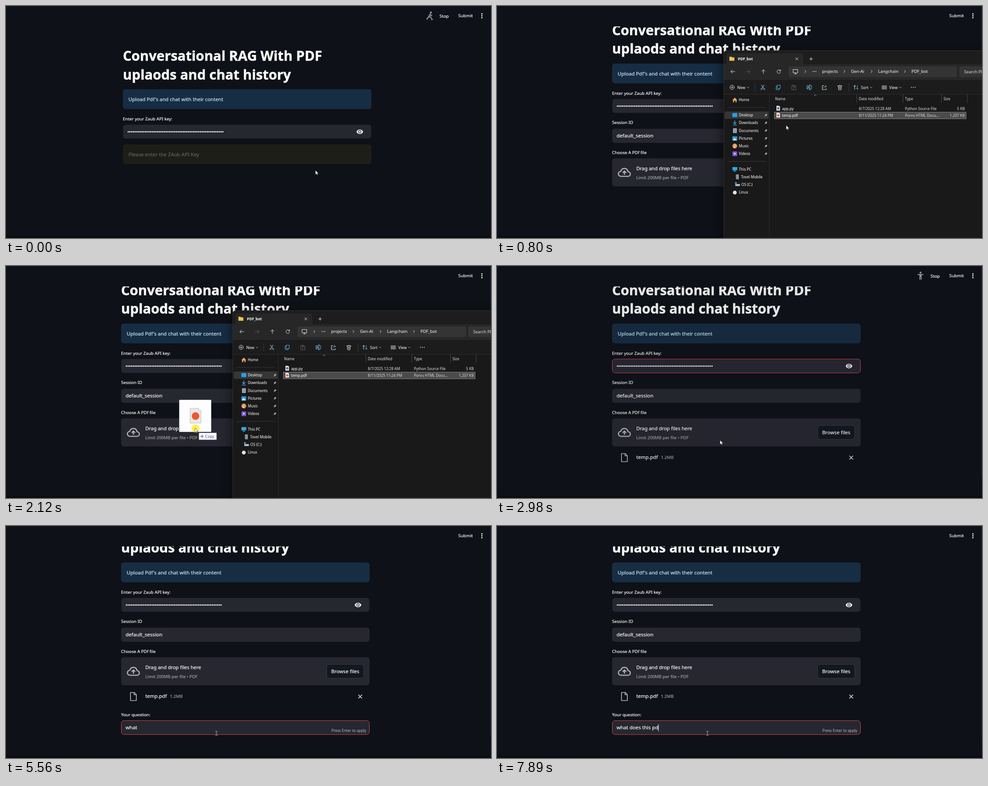
An HTML page for the animation above (8000 ms loop, 1083x517 px).

```html
<!DOCTYPE html>
<html lang="en">
<head>
<meta charset="utf-8">
<title>PDF chat demo</title>
<style>
html, body { margin: 0; width: 100%; height: 100%; overflow: hidden; background: #0e1117; }
svg { display: block; width: 100vw; height: 100vh; }
text { font: 11.2px "Noto Sans", "Open Sans", sans-serif; color: #fafafa; fill: currentColor; stroke: currentColor; stroke-width: .22; white-space: pre; }
.title { font-size: 30.35px; font-weight: 700; stroke-width: .5; }
.label { font-size: 9.62px; }
.bar { font-size: 9.8px; }
.dim { font-size: 9.6px; color: #a0a1a7; }
.hint { font-size: 8.35px; color: #9a9ba1; }
.field { fill: #262730; stroke: none; }
.field.focus { stroke: #d2484b; }
.line { fill: none; stroke: #e4e4e4; stroke-linecap: round; stroke-linejoin: round; }
.blue { stroke: #55b4ea; }
.faint { stroke: #5d5d5d; }
#explorer text { font-size: 8.18px; color: #ececec; stroke-width: .1; }
#explorer .path { font-size: 9.4px; }
#explorer .cmd { font-size: 8.6px; }
#explorer .tab { font-size: 8.3px; font-weight: 600; }
#explorer .grey { color: #cfcfcf; }
</style>
</head>
<body>
<svg viewBox="0 0 1083 517">
  <defs>
    <filter id="blur" x="-20%" y="-20%" width="140%" height="140%"><feGaussianBlur stdDeviation="13"/></filter>
    <linearGradient id="edge" x2="0" y2="1"><stop stop-color="#000" stop-opacity="0"/><stop offset="1" stop-color="#000" stop-opacity=".45"/></linearGradient>
    <path id="pin" d="M.6 -3.4L3.4 -.6L2.2 -.2L1 1L.7 2.7L-.6 1.4L-3.4 3.8L-1.3 .7L-2.7 -.7L-1 -1L.2 -2.2Z" fill="#b5b5b5"/>
    <path id="next" class="line" d="M-1.3 -2.6L1.3 0L-1.3 2.6"/>
    <path id="down" class="line" d="M-2 -1L0 1L2 -1" stroke-width=".8"/>
  </defs>
  <rect width="1083" height="517" fill="#0e1117"/>

  <g id="page">
    <text class="title" x="257" y="65">Conversational RAG With PDF</text>
    <text class="title" x="257" y="106.4">uplaods and chat history</text>
    <rect x="257" y="128.3" width="555" height="44.2" rx="6" fill="#172d43"/>
    <text x="269.5" y="154.6" style="color:#c7ebff">Upload Pdf's and chat with their content</text>
    <text class="label" x="257" y="197.8">Enter your Zaub API key:</text>
    <rect id="key" class="field" x="257.5" y="207.3" width="554" height="31" rx="6"/>
    <path d="M269 223H480.5" stroke="#fafafa" stroke-width="3.1" stroke-linecap="round" stroke-dasharray="0 3.84"/>
    <g transform="translate(786 223)">
      <path d="M-7.5 0C-4.5 -6.6 4.5 -6.6 7.5 0C4.5 6.6 -4.5 6.6 -7.5 0Z" fill="#fafafa"/>
      <circle r="3.4" fill="#262730"/><circle r="2" fill="#fafafa"/>
    </g>
    <g id="warning">
      <rect x="257" y="251.2" width="555" height="44" rx="6" fill="#1e1e18"/>
      <text x="269.5" y="277.5" style="color:#62615c">Please enter the ZAub API Key</text>
    </g>
    <g id="session">
      <text class="label" x="257" y="263.4">Session ID</text>
      <rect class="field" x="257" y="273.5" width="555" height="31.5" rx="6"/>
      <text x="267" y="293" style="font-size:11.35px">default_session</text>
      <text class="label" x="257" y="330">Choose A PDf file</text>
      <rect class="field" x="257" y="339.5" width="555" height="62.5" rx="6"/>
      <g class="line" transform="translate(284.5 371)" style="stroke:#b4b5bc" stroke-width="2.4">
        <path d="M-7.5 8.6C-15 8.6 -15.5 -1.6 -8 -2.6C-5.5 -11.5 6.5 -11 8 -1.6C15 -1.6 15 8.6 8 8.6Z"/>
        <path d="M0 5V-2.6M-4 .6L0 -3.2L4 .6" stroke-linecap="butt"/>
      </g>
      <text x="311" y="366.4" style="font-size:10.95px">Drag and drop files here</text>
      <text class="dim" x="311" y="385.8">Limit 200MB per file • PDF</text>
      <rect x="716" y="355.3" width="83" height="31" rx="6" fill="#131720" stroke="#3b3d46"/>
      <text x="757.5" y="374.8" text-anchor="middle">Browse files</text>
    </g>
    <g id="file">
      <path class="line" d="M278 418H286.5L291 422.5V436H278ZM286 418.3V423H290.7" style="stroke:#b4b5bc" stroke-width="1.7"/>
      <text x="311" y="429.8">temp.pdf</text>
      <text class="dim" x="366" y="429.8">1.2MB</text>
      <path class="line" d="M787.2 423.2L794.8 430.8M794.8 423.2L787.2 430.8" stroke-width="1.5"/>
    </g>
    <g id="question">
      <text class="label" x="257" y="471.2">Your question:</text>
      <rect id="ask" class="field" x="257.5" y="480.7" width="554" height="31" rx="6"/>
      <text id="typed" x="267" y="500.2"></text>
      <rect id="caret" y="489" width="1" height="15.6" fill="#fafafa"/>
      <text id="hint" class="hint" x="804.5" y="506" text-anchor="end">Press Enter to apply</text>
    </g>
  </g>

  <rect width="1083" height="45.5" fill="#0e1117"/>
  <g id="running">
    <g id="skier" class="line" style="stroke:#929294" stroke-width="2">
      <circle cx="948.8" cy="14.6" r="1.3" fill="#929294"/>
      <path d="M946.8 18L943.5 24L949 25.5L951.5 30M946.8 18L950 22M943.5 24L940 29.5" stroke-width="2.2"/>
      <path d="M951.5 20L939.5 27.5M949 31L953.5 30" stroke-width="1.1"/>
    </g>
    <g id="person" class="line" style="stroke:#929294" stroke-width="2">
      <circle cx="945.7" cy="14.8" r="1.2" fill="#929294"/>
      <path d="M939.2 19H952.2" stroke-linecap="butt"/>
      <path d="M944.2 19V30.5M947.2 19V30.5M945.7 19V24.5" stroke-linecap="butt"/>
    </g>
    <text class="bar" x="968" y="25.6">Stop</text>
  </g>
  <text class="bar" x="1009.8" y="25.3">Submit</text>
  <g fill="#fafafa"><circle cx="1062.7" cy="17.4" r="1.5"/><circle cx="1062.7" cy="21.7" r="1.5"/><circle cx="1062.7" cy="26" r="1.5"/></g>
  <rect id="scrollbar" x="1082" width="1" height="470" fill="#25272f"/>
  <rect y="511" width="1083" height="6" fill="url(#edge)"/>

  <g id="explorer">
    <rect x="506" y="106" width="620" height="450" opacity=".6" filter="url(#blur)"/>
    <path d="M506.5 520V107Q506.5 99.5 514 99.5H1090V520Z" fill="#1d1d1d" stroke="#333"/>
    <path d="M507 130H512V111Q512 105.5 517 105.5H679Q684 105.5 684 111V130H1083V163.5H507Z" fill="#272727"/>
    <rect x="507" y="163.5" width="576" height="33.5" fill="#1c1c1c"/>
    <rect x="507" y="197" width="576" height="320" fill="#191919"/>
    <path d="M507 163.5H1083M507 196.8H1083M608 197V517" stroke="#2f2f2f"/>
    <path d="M519 113H523.5L525 114.5H530V122H519Z" fill="#f5c254"/>
    <text class="tab" x="538" y="121">PDF_bot</text>
    <g class="line">
      <path d="M666.8 115L672.2 120.4M672.2 115L666.8 120.4M698 118H704.6M701.3 114.7V121.3"/>
      <path d="M531 146.3H522.2M525.8 142.6L522 146.3L525.8 150M594.8 150.4V142.2M591.2 145.6L594.8 142L598.4 145.6"/>
      <path class="faint" d="M556.5 146.3H565M561.4 142.6L565.2 146.3L561.4 150"/>
      <path d="M632.8 144.2A4 4 0 1 0 633.3 147M633.2 141.8V144.6H630.4"/>
    </g>
    <rect x="651" y="134.5" width="376" height="24" rx="4" fill="#343434"/>
    <rect x="1032.5" y="134.5" width="60" height="24" rx="4" fill="#343434"/>
    <path class="line" d="M661.5 141.5H671.5V148.8H661.5ZM664 151.3H669M666.5 149V151"/>
    <g fill="#e4e4e4"><circle cx="705.5" cy="146" r=".9"/><circle cx="708.8" cy="146" r=".9"/><circle cx="712.1" cy="146" r=".9"/>
      <circle cx="925.4" cy="181.3" r="1"/><circle cx="929.6" cy="181.3" r="1"/><circle cx="933.8" cy="181.3" r="1"/></g>
    <use href="#next" x="688.5" y="146"/><use href="#next" x="776" y="146"/><use href="#next" x="836.5" y="146"/><use href="#next" x="911" y="146"/>
    <text class="path" x="726" y="149.4">projects</text>
    <text class="path" x="790.5" y="149.4">Gen-Ai</text>
    <text class="path" x="851" y="149.4">Langchain</text>
    <text class="path" x="925.5" y="149.4">PDF_bot</text>
    <text class="path grey" x="1043" y="149.8">Search PDF_bot</text>

    <g class="line">
      <circle cx="525" cy="181.2" r="4.8"/><path d="M522.7 181.2H527.3M525 178.9V183.5"/>
      <path d="M590.5 176L595.8 184M596.5 176L591.2 184"/><g class="blue"><circle cx="590.4" cy="185.2" r="1.5"/><circle cx="596.6" cy="185.2" r="1.5"/></g>
      <path class="blue" d="M626 176.5H632.5V184H626ZM626 178.5H623.3V186.5H630V184.2"/>
      <path class="faint" d="M660 177.5H658V186.7H662M664.5 177.5H666.5V180M660.3 176.5H664.2V178.5H660.3ZM662.5 180.5H667.5V187H662.5Z"/>
      <path class="blue" d="M697.5 177.5H692V185H697.5M700 177.5H702.5V185H700M698.8 175.8V186.8M697.5 175.8H700M697.5 186.8H700"/>
      <path d="M693.6 183.4L695.4 179L697.2 183.4"/>
      <path d="M730 177.5H726.5V186.3H735.3V184"/><path class="blue" d="M729 183Q729.5 179 735.5 179M733 176.5L736 179L733 181.6"/>
      <path d="M760.5 178H770.5M762 178L762.8 186.8H768.2L769 178M764 178Q765.5 174 767 178M764.5 180.5V184M766.5 180.5V184"/>
      <path d="M798.7 185.8V177M796.4 179.2L798.7 176.8L801 179.2"/><path class="blue" d="M804.6 177V185.8M802.3 183.4L804.6 185.8L806.9 183.4"/>
      <path d="M859.5 178H870M859.5 180.3H870M859.5 182.6H870M859.5 184.9H870"/>
      <path d="M575.5 172V191M786 172V191" style="stroke:#3a3a3a"/>
      <path d="M708.3 199.8L710.5 197.9L712.7 199.8" stroke-width=".7"/>
      <path d="M803.5 197V215.5M906.5 197V215.5M992.5 197V215.5M1050 197V215.5" style="stroke:#4a4a4a"/>
      <path d="M515 226H600M515 346.3H600" style="stroke:#373737"/>
    </g>
    <text class="cmd" x="536.5" y="184.5">New</text><use href="#down" x="560.5" y="181.5"/>
    <text class="cmd" x="812.8" y="184.5">Sort</text><use href="#down" x="835.5" y="181.5"/>
    <text class="cmd" x="876" y="184.5">View</text><use href="#down" x="900.5" y="181.5"/>

    <rect x="508.5" y="235" width="98" height="16.5" rx="2" fill="#363636"/>
    <rect x="619.5" y="236.5" width="428" height="14.8" fill="#4b4b4b" stroke="#858585"/>
    <g id="cells"></g>
    <path d="M624 222.5H630L632 224.5V233H624ZM624 238H630L632 240V248.5H624Z" fill="#ededed"/>
    <rect x="625.5" y="225.5" width="5" height="5" fill="#3c78aa"/>
    <circle cx="628" cy="243.6" r="2.7" fill="#f0643a"/>

    <path d="M525.8 209.5L531 204L536.2 209.5L535 210V214.5H532.6V211H529.4V214.5H527V210Z" fill="#eda35b"/>
    <rect x="525.5" y="238.5" width="11" height="9" rx="1" fill="#26a0e8"/>
    <path class="line blue" d="M531 255.5V262.5M527.8 259.5L531 262.7L534.2 259.5M527 265.3H535" stroke-width="1.3"/>
    <rect x="527" y="272.5" width="8.5" height="10.5" rx="1" fill="#a8b5c2"/><path d="M528.8 275.5H533.6M528.8 278H533.6M528.8 280.5H533.6" stroke="#596a7b"/>
    <rect x="525.5" y="290.5" width="11" height="9" rx="1" fill="#2b99df"/><path d="M526 299.5L530.5 294L536 299.5Z" fill="#d9f1ff"/>
    <circle cx="531" cy="312" r="5.4" fill="#e39259"/><path class="line" d="M531 314.5V309.3L533 310.4" stroke-width=".9"/><circle cx="530" cy="314.4" r="1.2" fill="#fff"/>
    <rect x="525.8" y="324" width="10.4" height="10.4" rx="1.5" fill="#7d55d9"/><path d="M529.6 326.8L533.6 329.2L529.6 331.6Z" fill="#fff"/>
    <path d="M525.7 359H536.5V366.3H525.7ZM530 366H532V368H534V369H528V368H530Z" fill="#31a8dc"/>
    <rect x="533.5" y="375.3" width="6.6" height="11" rx="1.2" fill="#8d9398"/>
    <rect x="532" y="396.8" width="10.5" height="4.5" rx="1" fill="#b8bfc6"/><rect x="531.5" y="392.5" width="3.8" height="3.8" fill="#33a7e8"/>
    <circle cx="531" cy="415.7" r="4.3" fill="#e3e3e0"/>
  </g>

  <g id="pointer">
    <g id="thumb">
      <rect x="-35" y="-62.5" width="71" height="71" rx="1" fill="#fdfdff" stroke="#e4e2f0" stroke-width=".6"/>
      <path d="M-11 -44H8L13.5 -38.5V-11H-11Z" fill="#e9e9e9" stroke="#bdbdbd"/><path d="M8 -44V-38.5H13.5" fill="#fff" stroke="#bdbdbd"/>
      <circle cx="1.2" cy="-26.5" r="8.4" fill="#f0562f"/>
    </g>
    <circle id="press" cx="1" cy="1" r="9" fill="#fff04a" opacity=".95"/>
    <g id="copy">
      <rect x="9" y="11" width="39" height="15" fill="#fff" stroke="#c9c9d8" stroke-width=".6"/>
      <path d="M12 18.5H19.5M15.8 14.8V22.2" stroke="#3a3fae" stroke-width="1.2"/>
      <text x="22.5" y="21.6" style="font-size:8.6px;color:#3a3fae;stroke:none">Copy</text>
    </g>
    <path id="arrow" d="M0 0V9.8L2.3 7.7L3.8 11L5.3 10.3L3.9 7.2H6.8Z" fill="#fff" stroke="#111" stroke-width=".6"/>
    <path id="beam" class="line" d="M-2.5 -4.3H-.6L0 -3.8L.6 -4.3H2.5M0 -3.8V3.8M-2.5 4.3H-.6L0 3.8L.6 4.3H2.5" style="stroke:#b5b5b8" stroke-width=".9"/>
  </g>
</svg>
<script>
const $ = id => document.getElementById(id);
const LOOP = 8000, TICK = 66.2;

const put = (x, y, str, cls = '', anchor = 'start') =>
  `<text x="${x}" y="${y}" class="${cls}" text-anchor="${anchor}">${str}</text>`;

const places = ['Desktop', 'Downloads', 'Documents', 'Pictures', 'Music', 'Videos'];
const columns = [621, 808, 911, 997];
$('cells').innerHTML = put(540, 212, 'Home')
  + places.map((s, i) => put(540, 246.2 + 17.2 * i, s) + `<use href="#pin" x="600.5" y="${243.3 + 17.2 * i}"/>`).join('')
  + put(540, 366.5, 'This PC') + put(545, 383.8, 'Tovel Mobile') + put(545.5, 401, 'OS (C:)') + put(540, 418.3, 'Linux')
  + ['Name', 'Date modified', 'Type', 'Size'].map((s, i) => put(columns[i], 210, s, 'grey')).join('')
  + [['app.py', '8/7/2025 12:28 AM', 'Python Source File', '5 KB'],
     ['temp.pdf', '8/11/2025 11:24 PM', 'Porvu HTML Docu...', '1,207 KB']].map((row, r) =>
      row.map((s, i) => i < 3 ? put(i ? columns[i] : 636.5, 231.5 + 15.6 * r, s, i ? 'grey' : '')
                              : put(1044.5, 231.5 + 15.6 * r, s, 'grey', 'end')).join('')).join('');

const out = p => 1 - (1 - p) ** 2.4;
const smooth = p => p * p * (3 - 2 * p);
// start, end, x, y, easing
const moves = [
  [0, 200, 509, 407, smooth],
  [465, 1000, 661, 250, out],
  [1465, 2120, 422, 361, smooth],
  [2120, 2310, 430, 366, smooth],
  [2650, 2910, 498, 388, smooth],
  [3320, 3640, 474, 455, smooth],
  [3640, 3900, 470, 462, out]
];
function pointerAt(t) {
  let x = 691, y = 366;
  for (const [a, b, tx, ty, ease] of moves) {
    if (t <= a) break;
    const p = ease(Math.min(1, (t - a) / (b - a)));
    x += (tx - x) * p;
    y += (ty - y) * p;
  }
  return [x, y];
}

const phrase = 'what does this pd';
const keys = [4500, 4630, 4830, 5030, 5900, 5960, 6090, 6160, 6230, 6360, 6360, 6500, 6620, 6760, 6890, 7350, 7890];
const FOCUS = 4100;

const show = (id, on) => { $(id).style.display = on ? '' : 'none'; };

function draw(t) {
  const within = (a, b) => t >= a && t < b;
  const start = t < 70, asking = t >= 3110, focused = t >= FOCUS;

  $('page').setAttribute('transform', start ? 'translate(4 57.2)' : `translate(0 ${asking ? -47 : 0})`);
  $('page').style.opacity = within(2780, 3110) ? 0.92 : 1;
  show('warning', start);
  show('session', !start);
  show('scrollbar', !start);
  show('file', t >= 2310);
  show('question', asking);
  $('key').classList.toggle('focus', within(2250, FOCUS));
  $('ask').classList.toggle('focus', focused);

  show('running', start || within(2710, 3110));
  const standing = within(2710, 3110) && Math.floor((t - 2710) / 133) % 2 === 0;
  show('person', standing);
  show('skier', !standing);

  show('explorer', within(130, 2250));
  $('explorer').style.opacity = t < 195 ? 0.7 : 1;

  const count = keys.filter(k => k <= t).length;
  const last = count ? keys[count - 1] : FOCUS;
  $('typed').textContent = phrase.slice(0, count);
  $('caret').setAttribute('x', 267 + (count ? $('typed').getComputedTextLength() : 0));
  show('caret', focused && (t - last) % 1060 < 530);
  show('hint', count > 0);

  const [x, y] = pointerAt(Math.floor(t / TICK + 0.07) * TICK);
  const beam = asking && y > 433, drag = within(1530, 2190);
  $('pointer').setAttribute('transform', `translate(${x.toFixed(2)} ${y.toFixed(2)})`);
  $('press').setAttribute('cx', beam ? -1 : 1);
  $('press').setAttribute('cy', beam ? 0 : 1);
  show('press', within(1330, 2190) || within(FOCUS, 4230));
  show('thumb', drag);
  show('copy', drag && x < 506);
  show('beam', beam);
  show('arrow', !beam);
}

const t0 = performance.now();
function frame() {
  draw((performance.now() - t0) % LOOP);
  requestAnimationFrame(frame);
}
frame();
</script>
</body>
</html>
```
